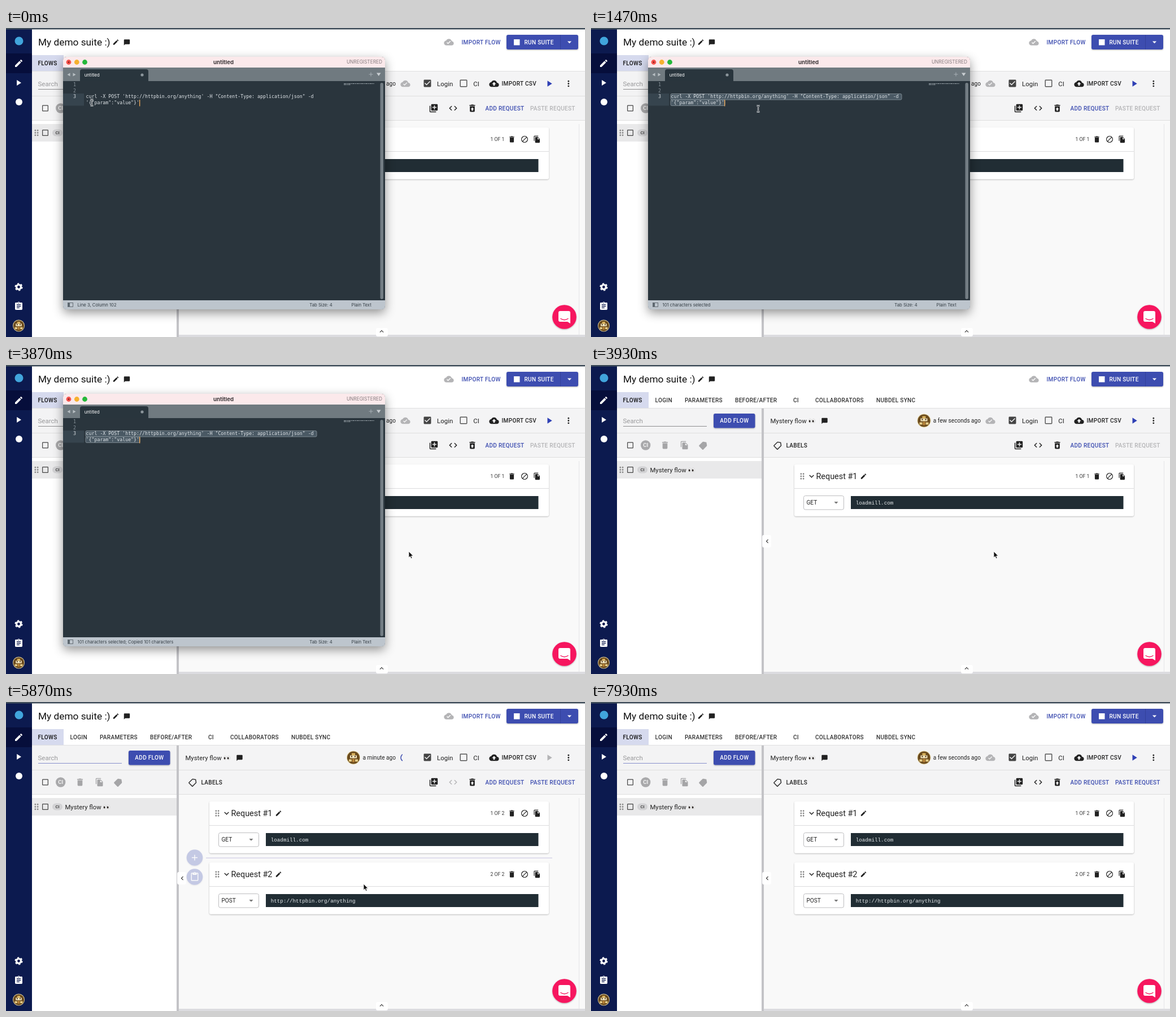
An HTML page for the animation above (7.99 s loop, 1025 px wide and 547 px high).

```html
<!DOCTYPE html>
<html lang="en">
<head>
<meta charset="utf-8">
<title>Paste a request</title>
<style>
html, body { margin: 0; width: 100%; height: 100%; overflow: hidden; background: #fff; }
svg { display: block; width: 100%; height: 100%; }
text { font-family: Roboto, sans-serif; white-space: pre; }
.mac { font-family: Inter, sans-serif; }
.code { font-family: "DejaVu Sans Mono", monospace; }
.url { font-family: "Liberation Mono", monospace; }
</style>
</head>
<body>
<svg id="stage" viewBox="0 0 1025 547"></svg>
<script>
const LOOP = 7990;
const INK = '#212121', BLUE = '#3d4db0', FADED = '#b4b4b6';

const CLOUD = 'M19.35 10.04C18.67 6.59 15.64 4 12 4 9.1 4 6.6 5.64 5.35 8.04 2.34 8.36 0 10.9 0 14c0 3.3 2.7 6 6 6h13c2.76 0 5-2.24 5-5 0-2.64-2.05-4.78-4.65-4.96z';
const BIN = 'M19 4h-3.5l-1-1h-5l-1 1H5v2h14zM6 7v12q0 2 2 2h8q2 0 2-2V7z';
const SHAPES = {
  edit: 'M3 17.25V21h3.75L17.8 9.94l-3.75-3.75zM20.7 7.04q.7-.7 0-1.4l-2.34-2.35q-.7-.7-1.4 0l-1.83 1.83 3.75 3.75z',
  play: 'M8 5v14l11-7z',
  note: 'M20 2H4q-2 0-2 2v18l4-4h14q2 0 2-2V4q0-2-2-2z',
  synced: CLOUD + 'M10 17l-3.5-3.5 1.41-1.41L10 14.17 15.18 9l1.41 1.41z',
  upload: CLOUD + 'M14 13v4h-4v-4H7l5-5 5 5z',
  checked: 'M19 3H5q-2 0-2 2v14q0 2 2 2h14q2 0 2-2V5q0-2-2-2zM10 17l-5-5 1.41-1.41L10 14.17l7.59-7.59L19 8z',
  empty: 'M19 3H5q-2 0-2 2v14q0 2 2 2h14q2 0 2-2V5q0-2-2-2zM5 5h14v14H5z',
  bin: BIN,
  restore: BIN + 'M14 14v4h-4v-4H8l4-4 4 4z',
  copy: 'M16 1H4q-2 0-2 2v14h2V3h12zM15 5l6 6v10q0 2-2 2H8q-2 0-2-2V7q0-2 2-2zM14 12h5.5L14 6.5z',
  block: 'M12 2a10 10 0 1 0 .01 0zM16.9 5.7L5.7 16.9A8 8 0 0 1 16.9 5.7zM7.1 18.3L18.3 7.1A8 8 0 0 1 7.1 18.3z',
  addCopy: 'M4 6H2v14q0 2 2 2h14v-2H4zM20 2H8q-2 0-2 2v12q0 2 2 2h12q2 0 2-2V4q0-2-2-2zM19 11h-4v4h-2v-4H9V9h4V5h2v4h4z',
  code: 'M9.4 16.6L4.8 12l4.6-4.6L8 6l-6 6 6 6zM14.6 16.6l4.6-4.6-4.6-4.6L16 6l6 6-6 6z',
  tasks: 'M19 3h-4.2a3 3 0 0 0-5.6 0H5q-2 0-2 2v14q0 2 2 2h14q2 0 2-2V5q0-2-2-2zM12 3a1 1 0 1 1-.01 0zM14 17H7v-2h7zM17 13H7v-2h10zM17 9H7V7h10z',
  paste: 'M19 2h-4.2a3 3 0 0 0-5.6 0H5q-2 0-2 2v16q0 2 2 2h14q2 0 2-2V4q0-2-2-2zM12 2a1 1 0 1 1-.01 0zM19 20H5V4h2v3h10V4h2z',
  add: 'M19 13h-6v6h-2v-6H5v-2h6V5h2v6h6z',
  caret: 'M7 10l5 5 5-5z',
  down: 'M16.6 8.6L12 13.2 7.4 8.6 6 10l6 6 6-6z',
  tag: 'M16 5H5q-2 0-2 2v10q0 2 2 2h11q1 0 1.6-.8L22 12l-4.4-6.2Q17 5 16 5z',
  tagLine: 'M16 5H5q-2 0-2 2v10q0 2 2 2h11q1 0 1.6-.8L22 12l-4.4-6.2Q17 5 16 5zM16 17H5V7h11l3.5 5z',
  drag: [6, 12, 18].map(y => [9, 15].map(x => `M${x} ${y - 2}a2 2 0 1 0 .01 0z`).join('')).join(''),
  more: [6, 12, 18].map(y => `M12 ${y - 2}a2 2 0 1 0 .01 0z`).join('')
};

const rect = (x, y, w, h, fill, more = '') =>
  `<rect x="${x}" y="${y}" width="${w}" height="${h}" fill="${fill}" ${more}/>`;
const dot = (x, y, r, fill, more = '') => `<circle cx="${x}" cy="${y}" r="${r}" fill="${fill}" ${more}/>`;
const icon = (name, x, y, size = 17.3, fill = INK, turn = 0, id = '') =>
  `<path ${id && `id="${id}"`} d="${SHAPES[name]}" fill="${fill}" fill-rule="evenodd" transform="translate(${x} ${y}) rotate(${turn}) scale(${size / 24}) translate(-12 -12)"/>`;
// y is the middle of the capitals
const text = (x, y, str, size, fill = INK, more = '') =>
  `<text x="${x}" y="${y + size * .357}" font-size="${size}" fill="${fill}" ${more}>${str}</text>`;
const caps = (x, y, str, fill = INK, more = '') =>
  text(x, y, str, 10.08, fill, `font-weight="500" letter-spacing=".28" ${more}`);
const group = (id, body, more = '') => `<g id="${id}" ${more}>${body}</g>`;

const avatar = (x, y, r) => `<g transform="translate(${x} ${y}) scale(${r / 12})">` +
  dot(0, 0, 12, '#e3d3a2') + dot(0, 0, 11, '#6a4a1d') +
  rect(-3, -8, 6, 4, '#d9b25c') + rect(-6, -4, 12, 5, '#f3e6bd') +
  rect(-4, -3, 2, 2, '#3d210c') + rect(2, -3, 2, 2, '#3d210c') +
  rect(-8, 3, 5, 4, '#e8cf8a') + rect(3, 3, 5, 4, '#e8cf8a') + rect(-2, 2, 4, 6, '#b9853a') + '</g>';

const eyes = (x, y) => [0, 6].map(d =>
  `<ellipse cx="${x + d}" cy="${y}" rx="2.5" ry="3.4" fill="#fff" stroke="#bbb" stroke-width=".6"/>` +
  `<ellipse cx="${x + d - .8}" cy="${y + .5}" rx="1.4" ry="1.9" fill="#2b2523"/>`).join('');

const sidebar = () => rect(0, 2, 46, 545, '#0c1a4f') + rect(0, 45, 46, 35, '#060e3b') +
  dot(23, 23, 7.5, '#41a5dc') + icon('edit', 22.5, 62.5, 17.3, '#fff') +
  icon('play', 22, 97, 17.3, '#fff') + dot(23, 131, 6, '#fff') +
  dot(22.5, 458.5, 4, 'none', 'stroke="#fff" stroke-width="3.2"') +
  dot(22.5, 458.5, 6, 'none', 'stroke="#fff" stroke-width="2.2" stroke-dasharray="3.1 3.18"') +
  icon('tasks', 22.5, 492.5, 17.3, '#fff') + avatar(22.5, 527, 10.5);

const header = () => text(57, 25, 'My demo suite :)', 17.28, '#111') +
  icon('edit', 194.5, 25, 12.5) + icon('note', 214, 25.5, 12.5) +
  icon('synced', 784, 25, 17.3, FADED) + caps(806.5, 25, 'IMPORT FLOW', BLUE) +
  rect(886, 12, 127, 26, BLUE, 'rx="3" filter="url(#soft)"') + rect(981, 12, 1, 26, '#32409a') +
  rect(899, 20, 10.5, 10.5, '#fff') + caps(917.5, 25, 'RUN SUITE', '#fff') + icon('caret', 997.5, 25, 17.3, '#fff') +
  rect(46, 48, 56, 29, '#d6daee') + caps(56.5, 62, 'FLOWS', '#111') +
  [[113.5, 'LOGIN'], [166, 'PARAMETERS'], [255, 'BEFORE/AFTER'], [358, 'CI'], [397, 'COLLABORATORS'], [505, 'NUBDEL SYNC']]
    .map(([x, s]) => caps(x, 62, s, '#333')).join('');

const flowList = () => rect(46, 77, 256, 87, '#f3f3f4') + rect(46, 120, 256, 1, '#dedede') + rect(46, 163, 256, 1, '#dedede') +
  text(56.5, 98.5, 'Search', 11.52, '#9a9a9c') + rect(57, 108, 148, 1, '#8d8d8f', 'id="underline"') +
  rect(217, 86, 73.5, 25.5, BLUE, 'rx="3" filter="url(#soft)"') + caps(228.3, 98.5, 'ADD FLOW', '#fff') +
  icon('empty', 69.5, 142, 14.6, '#444') + dot(96.7, 142, 8.7, '#a9a9ab') +
  text(96.7, 142, 'CI', 9.6, '#fff', 'text-anchor="middle" font-weight="500"') +
  icon('bin', 131, 142, 17.3, '#a5a5a7') + icon('copy', 165.5, 142, 16, '#a5a5a7') + icon('tag', 199, 142, 18, '#a5a5a7', -45) +
  rect(46, 170, 256, 31, '#e9e9ea') + icon('drag', 54, 185.5, 17, '#888') + icon('empty', 69.5, 185.5, 14.6, '#444') +
  rect(82, 179.5, 18, 12, '#d2d2d4', 'rx="6"') + text(91, 185.5, 'CI', 7.6, '#333', 'text-anchor="middle" font-weight="500"') +
  text(104.5, 186, 'Mystery flow', 11.3) + eyes(175, 186);

const toolbar = () => rect(306, 77, 719, 87, '#f4f4f5') + rect(306, 120, 719, 1, '#dedede') + rect(306, 163, 719, 1, '#dedede') +
  text(317.5, 99, 'Mystery flow', 11.3) + eyes(388, 99) + icon('note', 413.5, 99, 12.5) +
  group('recent', avatar(589.5, 98.5, 12) + text(690, 98.5, 'a few seconds ago', 10.08, INK, 'text-anchor="end"') + icon('synced', 707, 98.5, 17.3, FADED)) +
  group('saving', avatar(615, 98.5, 12) + text(690, 98.5, 'a minute ago', 10.08, INK, 'text-anchor="end"') +
    group('spinner', `<path d="M-4.1 -5.7A7 7 0 0 0 -4.1 5.7" fill="none" stroke="${BLUE}" stroke-width="1.4"/>`)) +
  icon('checked', 746, 98, 17.3, '#444') + text(763, 98.5, 'Login', 11.52) +
  icon('empty', 810, 98, 17.3, '#555') + text(827.3, 98.5, 'CI', 11.52) +
  icon('upload', 864, 98.5) + caps(877.5, 98.5, 'IMPORT CSV') +
  icon('play', 961.5, 98.5, 18, '#2f40b5', 0, 'run') + icon('more', 995.8, 98.5) +
  icon('tagLine', 331, 142, 18, '#333', -45) + caps(345.5, 142, 'LABELS') +
  icon('addCopy', 757, 142) + icon('code', 791.5, 142, 17.3, INK, 0, 'codeView') + icon('restore', 825.5, 142) +
  caps(848.5, 142, 'ADD REQUEST', BLUE) + caps(928, 142, 'PASTE REQUEST', FADED, 'id="pasteLabel"');

const card = (n, method, url) => rect(360, 176, 601, 91.5, '#fff', 'rx="3" filter="url(#soft)"') +
  rect(360, 218, 601, 1, '#dcdcde') +
  icon('drag', 374, 197, 17, '#888') + icon('down', 390.5, 197, 17) +
  text(398.5, 197, `Request #${n}`, 14.4) + icon('edit', 482.5, 197, 12.5) +
  text(882.3, 197, `${n} OF <tspan class="total">1</tspan>`, 8.64, '#333', 'text-anchor="end"') +
  icon('bin', 895.5, 197, 14.4) + icon('block', 918, 197, 14.4) + icon('copy', 940, 197, 13.4) +
  rect(376.5, 231.5, 71, 24.5, '#fff', 'rx="3" stroke="#bdbdbf"') + text(381.5, 243.5, method, 10.08) + icon('caret', 434, 243.5, 17, '#777') +
  rect(460, 232, 482.5, 23, '#212d34') + text(468.7, 244, url, 9.25, '#e6eaec', 'class="url"');

const fab = (y, name) => dot(334, y, 14.3, BLUE, 'filter="url(#soft)"') + icon(name, 334, y, 17.3, '#fff');

const workspace = () => rect(302, 77, 4, 470, '#c3c3c7') + rect(306, 164, 719, 383, '#f9f9f9') +
  rect(1014, 170, 1, 373, '#e6e6e7') + rect(306, 543, 719, 4, '#dcdce0') +
  rect(303, 301, 16, 22, '#fff', 'rx="3"') + icon('down', 312, 312, 14, '#333', 90) +
  rect(655, 531, 21, 15, '#fff', 'rx="3"') + icon('down', 665, 537, 14, '#333', 180) +
  card(1, 'GET', 'loadmill.com') +
  group('second', card(2, 'POST', 'http://httpbin.org/anything'), 'transform="translate(0 108)"') +
  group('insert', rect(354, 275.5, 613, 1.2, '#6458b4') + group('fabs', fab(241.5, 'add') + fab(275.5, 'paste')));

const chat = () => dot(988.5, 511.5, 21.3, '#f6175f', 'filter="url(#soft)"') +
  '<path d="M981 501h15q3 0 3 3v19l-5-3h-13q-3 0-3-3v-13q0-3 3-3z" fill="#fff"/>' +
  '<path d="M982 514.500q6.500 4.500 13 0" fill="none" stroke="#f6175f" stroke-width="1.400" stroke-linecap="round"/>';

const mac = (x, y, str, size, fill, more = '') => text(x, y, str, size, fill, `class="mac" ${more}`);
const code = (y, str, x = 141.5, fill = '#dfe4e8') => text(x, y, str, 8.27, fill, 'class="code"');

const editor = () => group('editor',
  rect(101, 51, 570, 447, '#29353d', 'rx="6" filter="url(#deep)"') +
  '<path d="M101 71V57q0-6 6-6h558q6 0 6 6v14z" fill="#fbe9eb"/>' +
  dot(111, 60.5, 4.4, '#f4534d') + dot(111, 60.5, 1.3, '#7e1512') + dot(125.3, 60.5, 4.4, '#f6b12f') + dot(139.5, 60.5, 4.4, '#25b83a') +
  mac(385, 60.5, 'untitled', 9.6, '#3c3638', 'font-weight="700" text-anchor="middle"') +
  mac(666, 60.5, 'UNREGISTERED', 8.3, '#857b7e', 'text-anchor="end"') +
  rect(101, 70, 570, 24, '#707a80') +
  '<path d="M113.500 79.500v6l-5-3zM118.500 79.500v6l5-3z" fill="#b8bfc3"/>' +
  '<path d="M131 94V77q0-4 4-4h113q4 0 4 4v17z" fill="#29353d"/>' +
  mac(138.7, 83, 'untitled', 7.7, '#fff') + dot(241, 83, 2.6, '#8b959b') +
  icon('add', 646, 82, 12, '#a8b0b5') + '<path d="M656 79.500h7.500l-3.750 5.500z" fill="#c9ced2"/>' +
  rect(101, 116, 37, 21.5, '#36444e') +
  [100, 111, 121.5].map((y, i) => code(y, i + 1, 119, i < 2 ? '#87939b' : '#d5dade')).join('') +
  group('selection', rect(141, 116.5, 409, 10.5, '#4a5964', 'rx="2" stroke="#8b979f" stroke-width=".8"') +
    rect(141, 127, 96, 10.5, '#4a5964', 'rx="2" stroke="#8b979f" stroke-width=".8"')) +
  code(121.5, `curl -X POST 'http://httpbin.org/anything' -H "Content-Type: application/json" -d`) +
  code(132, `'{"param":"value"}'`) + rect(236, 127, 1.3, 11.5, '#f5ab58') +
  '<path d="M598 98.500h54M598 100.300h12" stroke="#aab3b9" stroke-width=".9" stroke-dasharray="4 .8 2 .8"/>' +
  rect(662.5, 97, 5.5, 383, '#737d84', 'rx="2.7"') +
  '<path d="M101 482h570v10q0 6-6 6H107q-6 0-6-6z" fill="#bdc5cd"/>' +
  rect(109.5, 486.5, 9, 7, 'none', 'stroke="#5c666e" stroke-width=".9"') + rect(110, 487, 3, 6, '#5c666e') +
  mac(126.5, 490, '', 7.7, '#333c43', 'id="status"') +
  mac(537.3, 490, 'Tab Size: 4', 7.7, '#333c43') + mac(611.5, 490, 'Plain Text', 7.7, '#333c43'));

const IBEAM = 'M-2.500 -5.500Q0 -5.500 0 -3.500Q0 -5.500 2.500 -5.500M0 -3.500V3.500M-2.500 5.500Q0 5.500 0 3.500Q0 5.500 2.500 5.500';
const pointers = () => group('pointer',
  group('beam', `<path d="${IBEAM}" fill="none" stroke="#e8ebed" stroke-width="2.400"/><path d="${IBEAM}" fill="none" stroke="#20282e" stroke-width=".900"/>`) +
  group('arrow', '<path d="M0 0V11l2.500-2.300 1.700 3.900 1.900-.800-1.700-3.800h3.400z" fill="#111" stroke="#fff" stroke-width=".800"/>') +
  group('hand', '<path d="M-1-4q1.200-1.200 2 0l.800 4 4 .900q1.200.400 1 2l-.800 4.500h-5L-3 3.600q-.300-1.400 1.500-1l1 .900z" fill="#111" stroke="#fff" stroke-width=".900"/>'));

const stage = document.getElementById('stage');
stage.innerHTML =
  `<defs><filter id="soft" x="-20%" y="-20%" width="140%" height="150%"><feDropShadow dx="0" dy="1" stdDeviation="1.2" flood-opacity=".3"/></filter>
  <filter id="deep" x="-10%" y="-10%" width="120%" height="125%"><feDropShadow dx="0" dy="6" stdDeviation="9" flood-opacity=".42"/></filter></defs>` +
  rect(0, 0, 1025, 547, '#fff') + header() + rect(46, 76, 979, 1, '#e0e0e1') + flowList() + toolbar() + workspace() +
  sidebar() + rect(0, 0, 1025, 2.5, '#42505c') + chat() + editor() + pointers();

const el = id => document.getElementById(id);
const show = (id, on) => el(id).setAttribute('visibility', on ? 'visible' : 'hidden');
const paint = (id, fill) => el(id).setAttribute('fill', fill);
const ramp = (t, from, to) => Math.min(1, Math.max(0, (t - from) / (to - from)));

const AT = { select: 540, copy: 2470, front: 3930, canPaste: 4130, pasted: 5450, saved: 6700, away: 7000 };
// time, x, y
const PATH = [
  [0, 152, 132], [800, 152, 132], [1400, 296, 143], [3200, 296, 143], [3750, 713, 330],
  [4270, 713, 330], [4930, 372, 279], [5100, 342, 276], [5500, 342, 276],
  [5870, 633, 322], [6350, 601, 409], [LOOP, 601, 409]
];

function pointerAt(t) {
  const i = PATH.findIndex(p => p[0] > t);
  const [a, b] = [PATH[i - 1], PATH[i]];
  const k = ramp(t, a[0], b[0]), ease = k * k * (3 - 2 * k);
  return [1, 2].map(n => a[n] + (b[n] - a[n]) * ease);
}

function draw(t) {
  const pasted = t >= AT.pasted, saving = pasted && t < AT.saved, inFront = t < AT.front;
  show('editor', inFront);
  show('selection', inFront && t >= AT.select);
  el('status').textContent = t < AT.select ? 'Line 3, Column 102'
    : '101 characters selected' + (t < AT.copy ? '' : '; Copied 101 characters');

  show('second', pasted);
  show('recent', !saving);
  show('saving', saving);
  paint('run', saving ? FADED : '#2f40b5');
  paint('codeView', saving ? FADED : INK);
  paint('pasteLabel', t < AT.canPaste ? FADED : BLUE);
  paint('underline', pasted ? '#8790cc' : '#8d8d8f');
  stage.querySelectorAll('.total').forEach(n => n.textContent = pasted ? 2 : 1);
  el('spinner').setAttribute('transform', `translate(706 98.5) rotate(${(t - 5870) / 1400 * 360})`);

  el('insert').setAttribute('opacity', ramp(t, 4820, 5100) * (1 - ramp(t, 5690, 5940)));
  el('fabs').setAttribute('transform', `translate(0 ${pasted ? 34 : 0})`);

  const [x, y] = pointerAt(t);
  const visible = t < AT.away;
  const beam = inFront && x < 662, hand = !inFront && x < 348;
  el('pointer').setAttribute('transform', `translate(${x} ${y})`);
  show('beam', visible && beam);
  show('hand', visible && hand);
  show('arrow', visible && !beam && !hand);
}

const start = performance.now();
function tick() {
  draw((performance.now() - start) % LOOP);
  requestAnimationFrame(tick);
}
tick();
</script>
</body>
</html>
```
